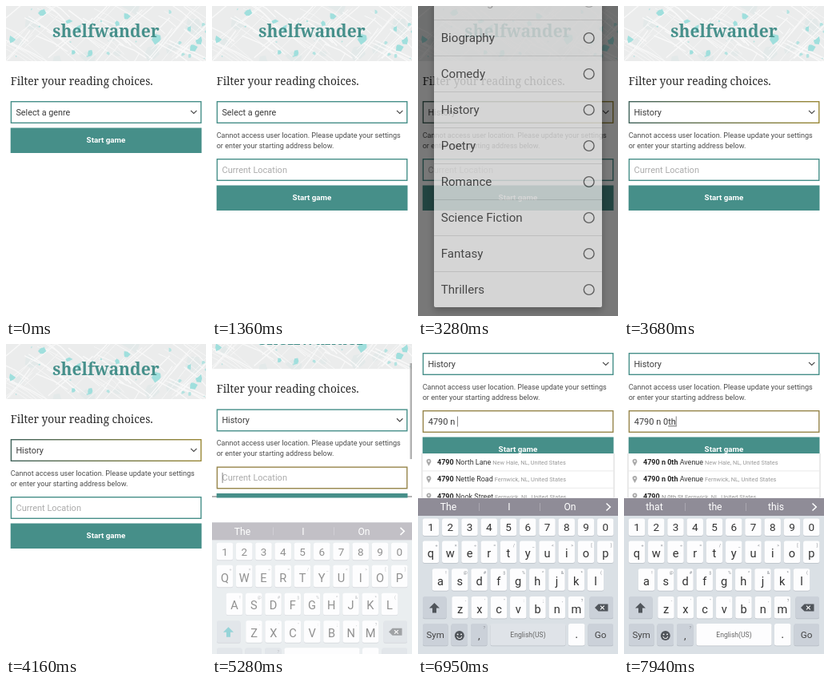
An HTML page with a canvas for the animation above (8 s loop, 250x388 px).

```html
<!DOCTYPE html>
<html lang="en">
<head>
<meta charset="utf-8">
<title>Reading game</title>
<style>
html, body { margin: 0; width: 100%; height: 100%; overflow: hidden; background: #fff; }
canvas { display: block; width: 100vw; height: 100vh; }
</style>
</head>
<body>
<canvas id="stage"></canvas>
<script>
const W = 250, H = 388, LOOP = 8000;
const canvas = document.getElementById('stage');
const layer = document.createElement('canvas');
const mainCtx = canvas.getContext('2d'), layerCtx = layer.getContext('2d');
let ctx = mainCtx;
const SANS = 'Roboto, sans-serif', SERIF = '"Noto Serif", serif';
const TEAL = '#468f89', GOLD = '#96854a', FOLD = 192.5;

// Timeline in ms
const T = {
  error: 880, open: 1640, pick: 3205, focusInput: 5040,
  keyboard: 5146, scroll: 5200, lower: 5900, refine: 7800
};
const TYPED = '4790 n 0th';
const KEY_TIMES = [5940, 6240, 6380, 6500, 6640, 6790, 6920, 7080, 7330, 7560];
const GENRES = ['Select a genre', 'Biography', 'Comedy', 'History', 'Poetry',
  'Romance', 'Science Fiction', 'Fantasy', 'Thrillers'];

const clamp = x => Math.max(0, Math.min(1, x));
const ramp = (t, start, length) => clamp((t - start) / length);
const smooth = p => p * p * (3 - 2 * p);

// Draws a group as one picture, then fades and shifts it as a whole.
function fadeGroup(alpha, dy, paint) {
  ctx = layerCtx;
  ctx.clearRect(0, 0, W, H);
  ctx.save();
  ctx.translate(0, dy);
  paint();
  ctx.restore();
  ctx = mainCtx;
  ctx.globalAlpha = alpha;
  ctx.drawImage(layer, 0, 0, W, H);
  ctx.globalAlpha = 1;
}

function text(str, x, y, size, color, { weight = 400, align = 'left', font = SANS } = {}) {
  ctx.font = `${weight} ${size}px ${font}`;
  ctx.textAlign = align;
  ctx.textBaseline = 'alphabetic';
  ctx.fillStyle = color;
  ctx.fillText(str, x, y);
  return ctx.measureText(str).width;
}

function rect(x, y, w, h, color) {
  ctx.fillStyle = color;
  ctx.fillRect(x, y, w, h);
}

function rounded(x, y, w, h, r, color) {
  ctx.beginPath();
  ctx.roundRect(x, y, w, h, r);
  ctx.fillStyle = color;
  ctx.fill();
}

function path(points, color, width) {
  ctx.beginPath();
  points.forEach(([x, y], i) => i ? ctx.lineTo(x, y) : ctx.moveTo(x, y));
  ctx.strokeStyle = color;
  ctx.lineWidth = width;
  ctx.stroke();
}

function polygon(points, color) {
  ctx.beginPath();
  points.forEach(([x, y]) => ctx.lineTo(x, y));
  ctx.closePath();
  ctx.fillStyle = color;
  ctx.fill();
}

function seeded(seed) {
  return () => {
    seed = (seed * 1664525 + 1013904223) >>> 0;
    return seed / 4294967296;
  };
}

// Header map
function blob(rnd, x, y, r, color) {
  const pts = [];
  for (let a = 0; a < 6; a++) {
    const d = r * (0.35 + rnd() * 0.85), ang = a / 6 * Math.PI * 2;
    pts.push([x + Math.cos(ang) * d, y + Math.sin(ang) * d]);
  }
  polygon(pts, color);
}

function header() {
  const rnd = seeded(41);
  ctx.save();
  ctx.beginPath();
  ctx.rect(0, 0, W, 69);
  ctx.clip();
  rect(0, 0, W, 69, '#ebecec');
  for (let i = 0; i < 14; i++) blob(rnd, rnd() * W, rnd() * 69, 5 + rnd() * 8, '#e3e9e9');
  for (let i = 0; i < 75; i++) {
    const x = rnd() * W, y = rnd() * 69, a = (rnd() < 0.5 ? 0.45 : -0.95) + rnd() * 0.3;
    const len = 10 + rnd() * 45, dx = Math.cos(a) * len, dy = Math.sin(a) * len;
    path([[x - dx, y - dy], [x + 2, y - 1], [x + dx, y + dy]], '#f9f9f9', 0.6 + rnd() * 0.9);
  }
  for (let i = 0; i < 20; i++) blob(rnd, rnd() * W, rnd() * 69, 1 + rnd() * 2, '#b3e3e1');
  const lakes = [[150, 13, 7], [190, 42, 7], [233, 51, 7], [229, 29, 5], [8, 42, 5],
    [78, 19, 5], [91, 28, 5], [45, 9, 5], [105, 59, 5], [84, 58, 4], [241, 43, 5], [140, 21, 4]];
  for (const [x, y, r] of lakes) blob(rnd, x, y, r, '#a0dfdd');
  ctx.restore();
  text('shelfwander', 125, 39, 21, '#46908b', { weight: 600, align: 'center', font: SERIF });
}

function field(y, border) {
  rect(5.7, y, 238.8, 28, border);
  rect(7.1, y + 1.4, 236, 25.2, '#fff');
}

function focusGradient() {
  const g = ctx.createLinearGradient(5, 0, 245, 0);
  g.addColorStop(0, '#40625a');
  g.addColorStop(1, '#9a8836');
  return g;
}

function typedCount(t) {
  return KEY_TIMES.filter(k => t >= k).length;
}

function pin(x, y) {
  ctx.beginPath();
  ctx.arc(x, y - 1.2, 2.9, Math.PI * 0.9, Math.PI * 2.1);
  ctx.lineTo(x, y + 4.8);
  ctx.closePath();
  ctx.fillStyle = '#a9a9a9';
  ctx.fill();
  ctx.beginPath();
  ctx.arc(x, y - 1.3, 1.1, 0, 7);
  ctx.fillStyle = '#fff';
  ctx.fill();
}

function places(t, y) {
  const done = t >= T.refine;
  const rows = done
    ? [['4790 n 0th', ' Avenue', 'New Hale, NL, United States'],
       ['4790 n 0th', ' Avenue', 'Fernwick, NL, United States'],
       ['4790 ', 'N 0th St', 'Fernwick, NL, United States']]
    : [['4790', ' North Lane', 'New Hale, NL, United States'],
       ['4790', ' Nettle Road', 'Fernwick, NL, United States'],
       ['4790', ' Nook Street', 'Fernwick, NL, United States']];
  rect(4.5, y, 241, 66, '#d4d4d4');
  rect(5.5, y, 239, 65, '#fff');
  rows.forEach(([bold, rest, city], i) => {
    const cy = y + 11 + i * 21.3;
    if (i) rect(5.5, cy - 10.8, 239, 0.8, '#e4e4e4');
    pin(13.5, cy);
    const small = done && i === 2;
    let x = 24;
    x += text(bold, x, cy + 3, 9, '#222', { weight: 700 });
    x += text(rest, x, cy + 3, small ? 7.6 : 9, small ? '#888' : '#333');
    text(city, x + 2, cy + 3, 7.4, '#999');
  });
}

function page(t) {
  const error = t >= T.error, inputFocus = t >= T.focusInput;
  const kb = t >= T.keyboard;
  const shift = 108 * smooth(ramp(t, T.scroll, 204));
  const count = typedCount(t);
  ctx.save();
  if (kb) {
    ctx.beginPath();
    ctx.rect(0, 0, W, FOLD);
    ctx.clip();
    if (shift < 108) rect(0, 190, W, 2, '#b4b4b4');
  }
  ctx.translate(0, -shift);
  header();
  text('Filter your reading choices.', 5.8, 98.6, 13.65, '#2a2a2a', { font: SERIF });

  const selectFocus = t >= T.open && !inputFocus;
  field(119, selectFocus ? focusGradient() : TEAL);
  text(t >= T.pick ? 'History' : 'Select a genre', 12.4, 136.6, 10.8, '#3a3a3a');
  path([[231, 130.8], [234.7, 134.5], [238.4, 130.8]], '#444', 1.1);

  if (error) {
    text('Cannot access user location. Please update your settings', 5.7, 164.8, 9.05, '#4c4c4c');
    text('or enter your starting address below.', 5.7, 177.9, 9.05, '#4c4c4c');
    field(191, inputFocus ? GOLD : TEAL);
    const value = TYPED.slice(0, count);
    if (!count) text('Current Location', 12.6, 208.7, 11, '#ababab');
    const width = count ? text(value, 12.7, 208.7, 11, '#3a3a3a') : 0;
    if (inputFocus) rect(12.7 + width, 198.5, 0.8, 13, '#666');
    if (count > 8) {
      const before = ctx.measureText(value.slice(0, 8)).width;
      rect(12.7 + before, 210.4, width - before, 0.8, '#444');
    }
  }

  const by = error ? 224.5 : 152.5;
  rect(5.7, by, 238.8, 31.5, TEAL);
  text('Start game', 125, by + 18.5, 9.8, '#fff', { weight: 700, align: 'center' });
  if (t >= KEY_TIMES[3] + 60) places(t, 245);
  ctx.restore();

  // Scroll thumb
  const fade = 1 - ramp(t, T.scroll + 260, 250);
  if (kb && fade > 0) rect(247.5, shift * 0.64, 2.5, 120, `rgba(130,130,130,${0.6 * fade})`);
}

// Genre dialog
function genreCard(t) {
  ctx.shadowColor = 'rgba(0,0,0,0.35)';
  ctx.shadowBlur = 10;
  ctx.shadowOffsetY = 4;
  rounded(20, -30, 210, 407, 2, '#fff');
  ctx.shadowColor = 'transparent';
  GENRES.forEach((name, i) => {
    const y = i * 45 - 5;
    text(name, 28.7, y + 5.2, 15.1, i ? '#333' : '#aaa');
    if (i < GENRES.length - 1) rect(20, y + 22, 210, 1, '#dedede');
    ctx.beginPath();
    ctx.arc(213.7, y, 6.4, 0, 7);
    ctx.strokeStyle = i ? '#555' : '#bbb';
    ctx.lineWidth = 1.4;
    ctx.stroke();
  });
  const thumb = 1 - ramp(t, 2200, 300);
  rect(227.8, 0, 2.2, 303, `rgba(160,160,160,${0.6 * thumb})`);
}

function dialog(t) {
  const shown = ramp(t, T.open, 180);
  const alpha = shown * (1 - ramp(t, T.pick, 250));
  const scrim = 0.53 * shown * (1 - ramp(t, T.pick + 80, 220));
  if (scrim > 0) rect(0, 0, W, H, `rgba(0,0,0,${scrim})`);
  if (alpha > 0) fadeGroup(alpha, 0, () => genreCard(t));
}

// Keyboard
const PITCH = 24.25;
const ROWS = [
  { keys: '1234567890', x: 16, y: 218.5, h: 21.5, marks: '' },
  { keys: 'qwertyuiop', x: 16, y: 246.5, h: 27.5, marks: '+×÷=/_<>[]' },
  { keys: 'asdfghjkl', x: 28, y: 281.3, h: 27.5, marks: '!@#$%^&*(' },
  { keys: 'zxcvbnm', x: 52.5, y: 316, h: 27.5, marks: "-'\":;,?" }
];

function key(x, y, w, h, pressed) {
  rounded(x, y + 0.8, w, h, 2.5, '#b9bec6');
  rounded(x, y, w, h, 2.5, pressed ? '#dfe3e8' : '#fdfdfe');
}

function sideKey(x, y, w) {
  rounded(x, y + 0.8, w, 27.5, 2.5, '#b4bac2');
  rounded(x, y, w, 27.5, 2.5, '#cbd1d9');
}

function pressedKey(t) {
  const i = KEY_TIMES.findIndex(k => t >= k - 30 && t < k + 60);
  return i < 0 ? null : TYPED[i];
}

function bar(t) {
  rect(0, 193, W, 22, '#8f8c97');
  let words = ['The', 'I', 'On'];
  if (t >= KEY_TIMES[8]) words = ['to', 'the', 'that'];
  if (t >= T.refine) words = ['that', 'the', 'this'];
  words.forEach((w, i) => text(w, 38 + i * 76, 208.3, 12.2, '#fff', { align: 'center' }));
  for (const x of [76, 152]) rect(x, 199, 0.8, 10, '#b0adb7');
  path([[235.5, 199.5], [240.3, 204], [235.5, 208.5]], '#fff', 1.5);
}

function shiftIcon(on) {
  polygon([[20.5, 324], [27, 330.5], [23, 330.5], [23, 336.5], [18, 336.5], [18, 330.5], [14, 330.5]],
    on ? '#3fb0b8' : '#50555b');
}

function deleteIcon() {
  polygon([[221, 330], [225.5, 325.5], [237.5, 325.5], [237.5, 334.5], [225.5, 334.5]], '#50555b');
  path([[228, 327.7], [232.8, 332.3]], '#fff', 1.1);
  path([[232.8, 327.7], [228, 332.3]], '#fff', 1.1);
}

function smiley(x, y) {
  ctx.beginPath();
  ctx.arc(x, y, 6, 0, 7);
  ctx.fillStyle = '#50555b';
  ctx.fill();
  ctx.fillStyle = '#fff';
  for (const d of [-2.2, 2.2]) {
    ctx.beginPath();
    ctx.arc(x + d, y - 1.6, 0.9, 0, 7);
    ctx.fill();
  }
  ctx.beginPath();
  ctx.arc(x, y + 0.6, 3, 0.15, Math.PI - 0.15);
  ctx.strokeStyle = '#fff';
  ctx.lineWidth = 1;
  ctx.stroke();
}

function keys(t) {
  const upper = t < T.lower, down = pressedKey(t);
  rect(0, 193, W, 195, '#dae0e5');
  bar(t);
  for (const { keys, x, y, h, marks } of ROWS) {
    [...keys].forEach((c, i) => {
      const cx = x + i * PITCH;
      key(cx - 10.2, y, 20.4, h, c === down);
      const label = upper ? c.toUpperCase() : c;
      const drop = marks ? 7 : 5;
      text(label, cx, y + h / 2 + drop, marks ? 14.6 : 13.5, '#333', { align: 'center' });
      if (marks) text(marks[i], cx + 7, y + 7, 5.5, '#8b8f95', { align: 'center' });
    });
  }
  sideKey(6, 316, 29.5);
  shiftIcon(upper);
  sideKey(214.5, 316, 29.5);
  deleteIcon();

  const y = 350;
  sideKey(6, y, 31.5);
  text('Sym', 21.7, y + 18, 11.5, '#444', { align: 'center' });
  sideKey(41.5, y, 20.5);
  smiley(51.8, y + 15);
  sideKey(66, y, 20.5);
  text(',', 76.2, y + 19, 13, '#444', { align: 'center' });
  text('?', 82.8, y + 7, 5.5, '#8b8f95', { align: 'center' });
  key(90.5, y, 94, 27.5, down === ' ');
  text('English(US)', 137.5, y + 17, 8.6, '#666', { align: 'center' });
  key(188, y, 20.5, 27.5, false);
  text('.', 198.2, y + 18, 15, '#333', { align: 'center' });
  sideKey(212.5, y, 31.5);
  text('Go', 228.2, y + 18, 11.8, '#444', { align: 'center' });
}

function keyboard(t) {
  const p = ramp(t, T.keyboard, 250);
  if (p > 0) fadeGroup(p, 66 * (1 - p), () => keys(t));
}

function fit(target, w, h) {
  if (target.width !== w || target.height !== h) {
    target.width = w;
    target.height = h;
  }
  target.getContext('2d').setTransform(w / W, 0, 0, h / H, 0, 0);
}

function draw(t) {
  const dpr = window.devicePixelRatio || 1;
  const w = Math.round(innerWidth * dpr), h = Math.round(innerHeight * dpr);
  fit(canvas, w, h);
  fit(layer, w, h);
  rect(0, 0, W, H, '#fff');
  page(t);
  dialog(t);
  keyboard(t);
}

const start = performance.now();
function tick() {
  draw((performance.now() - start) % LOOP);
  requestAnimationFrame(tick);
}
tick();
</script>
</body>
</html>
```
